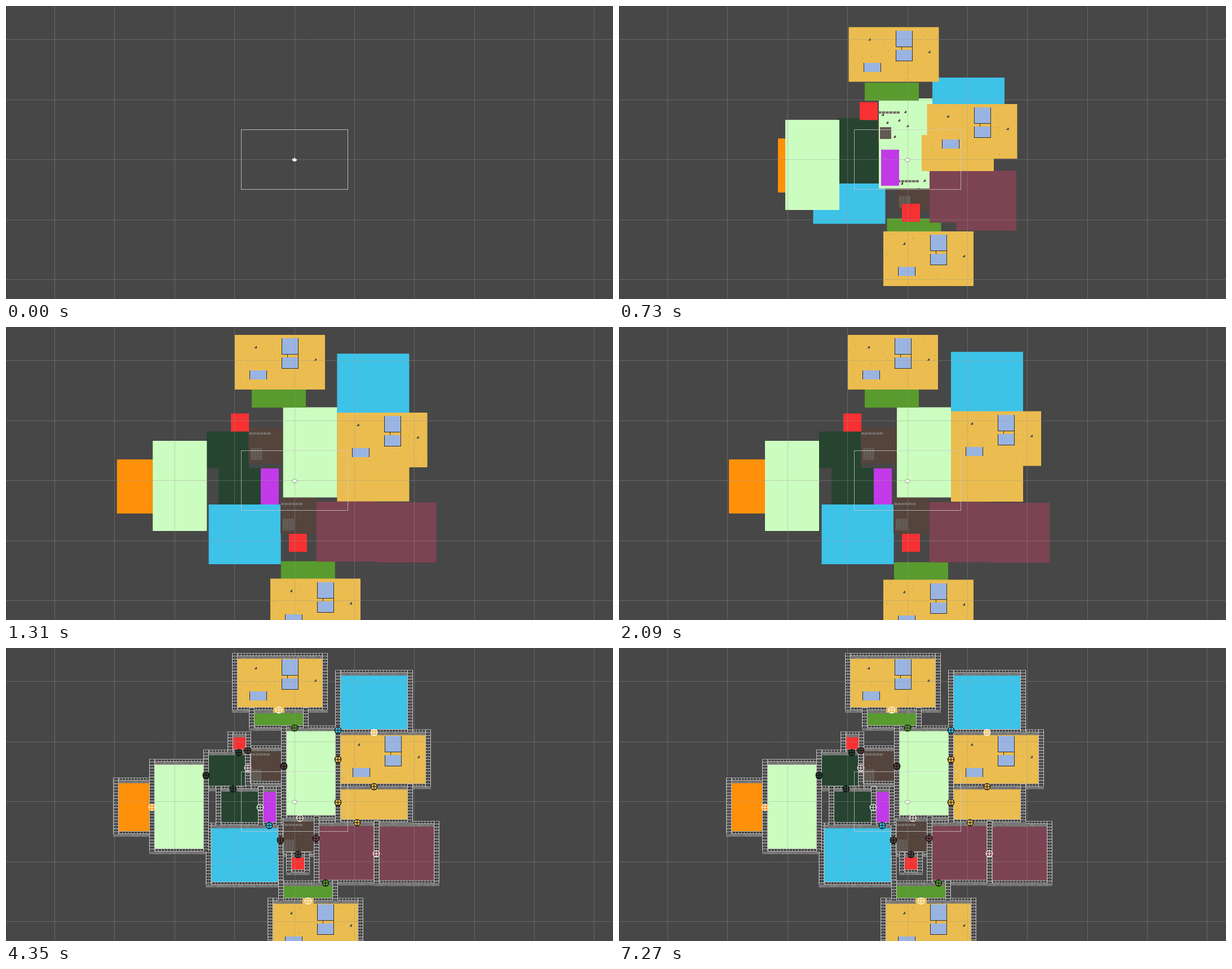
An HTML page with a canvas for the animation above (7400 ms loop, 1077 by 520 pixels).

```html
<!DOCTYPE html>
<html lang="en">
<head>
<meta charset="utf-8">
<title>Dungeon room layout</title>
<style>
  html, body { margin: 0; width: 100%; height: 100%; overflow: hidden; background: #474747; }
  canvas { display: block; width: 1077px; height: 520px; }
</style>
</head>
<body>
<canvas id="stage" width="1077" height="520"></canvas>
<script>
const ctx = document.getElementById('stage').getContext('2d');
const LOOP = 7400, PILE = 480, SPREAD = 660, WALLS = 3650, STEP = 65;

// kind: colour, width, height
const KINDS = {
  hall: ['#ebbc4f', 160, 97], annex: ['#ebbc4f', 128, 64], pool: ['#3dc2e8', 128, 106],
  lawn: ['#ccfdc0', 96, 160], path: ['#599b2f', 96, 32], cell: ['#f73131', 32, 32],
  moss: ['#264430', 75, 65], vault: ['#c23ae8', 32, 64], dock: ['#ff9009', 64, 96],
  wine: ['#7c4452', 106.5, 106.5], store: ['#54443c', 64, 64]
};

// back to front; positions after the first push, mid-way and at rest
const rooms = [
  ['dock', 282, 235, 209, 235, 195, 235],
  ['pool', 344.5, 280.5, 360.5, 315, 359.5, 315],
  ['moss', 387, 199, 365, 185.5, 355, 185.5],
  ['moss', 391, 250, 377, 250, 377, 250],
  ['store', 459, 178, 439, 178, 429, 178],
  ['store', 493, 300, 487, 303, 487, 303],
  ['lawn', 461, 164, 483, 142.5, 493, 142.5],
  ['pool', 556, 127, 577, 69, 589, 44],
  ['path', 475.5, 377, 486.5, 404, 488, 417.5],
  ['wine', 551, 278, 549, 303, 551, 311],
  ['wine', 598.5, 292, 654.5, 306, 657.5, 312],
  ['annex', 537, 229, 577.5, 243, 589, 246],
  ['hall', 546.5, 174, 578, 168.5, 589, 149.5],
  ['lawn', 295, 202, 269.5, 202, 259, 202],
  ['path', 436, 136, 436, 111, 436, 111],
  ['hall', 407.5, 37.5, 406, 14, 406, 14],
  ['hall', 469, 400, 469, 433.5, 469, 448.5],
  ['cell', 502, 351, 502, 367, 502, 367],
  ['cell', 427, 170.5, 407, 153.5, 398, 153.5],
  ['vault', 465, 255, 452, 251, 452, 251]
].map(([kind, ...p], i) => {
  const [color, w, h] = KINDS[kind];
  const pile = [491 + 21 * (i % 4) / 3 - w / 2, 273 + (h < 160 ? (i % 3 - 1) * 10 : 0) - h / 2];
  return { kind, color, w, h, seed: i + 1, keys: [pile, p.slice(0, 2), p.slice(2, 4), p.slice(4)] };
});
const isFront = r => r.kind === 'cell' || r.kind === 'vault';
const backRooms = rooms.filter(r => !isFront(r));
const frontRooms = rooms.filter(isFront);
const stores = rooms.filter(r => r.kind === 'store');

// x, y, floor seen in the opening, opening width
const lightDoors = [
  [484, 110, 'hall', 20], [653, 150, 'hall'], [429, 213, 'store'], [259, 283, 'dock'],
  [451, 283, 'moss'], [521.5, 302, 'store'], [657, 365, 'wine'], [536, 449, 'hall', 20]
];
const darkDoors = [
  [512, 142, 'path'], [589, 146, 'pool'], [589, 198, 'hall'], [653, 246, 'hall'],
  [589, 274, 'annex'], [623, 310, 'annex'], [493, 210, 'store'], [429, 182, 'store'],
  [413, 185.5, 'moss'], [355, 226, 'moss'], [403, 250, 'moss'], [467, 315, 'pool'],
  [487, 341, 'store'], [518, 366.5, 'store'], [550, 338, 'wine'], [567, 417, 'path']
];

const mix = (a, b, k) => a.map((v, i) => v + (b[i] - v) * k);

function random(seed) {
  let s = seed * 7919;
  return () => (s = (s * 16807 + 11) % 2147483647) / 2147483647;
}

function rect(color, x, y, w, h) {
  ctx.fillStyle = color;
  ctx.fillRect(x, y, w, h);
}

function line(color, width, x1, y1, x2, y2, dash = []) {
  ctx.strokeStyle = color;
  ctx.lineWidth = width;
  ctx.setLineDash(dash);
  ctx.beginPath();
  ctx.moveTo(x1, y1);
  ctx.lineTo(x2, y2);
  ctx.stroke();
  ctx.setLineDash([]);
}

function place(keys, t) {
  if (t < SPREAD) return keys[0];
  const s = Math.floor((t - SPREAD) / STEP) * STEP;
  if (s < STEP) return mix(keys[0], keys[1], 0.68);
  if (s < 5 * STEP) {
    const ease = d => 1 - Math.exp(-d / 145);
    return mix(keys[1], keys[2], ease(s - STEP) / ease(4 * STEP));
  }
  return s >= 1425 ? keys[3] : mix(keys[2], keys[3], 1 - Math.exp((5 * STEP - s) / 160));
}

function panel(x, y, w, h) {
  rect('#9ab4e2', x, y, w, h);
  line('#30302c', 1, x - 0.5, y, x - 0.5, y + h);
  line('#30302c', 1, x + w + 0.5, y, x + w + 0.5, y + h);
}

function hallDetails(x, y, seed) {
  const rnd = random(seed);
  for (let i = 0; i < 34; i++) {
    rect(i % 5 ? '#b8934a' : '#6d7d48', x + 4 + rnd() * 152, y + 4 + rnd() * 88, 1, 1);
  }
  const left = Math.round(x), top = Math.round(y);
  panel(left + 84, top + 6, 28, 28);
  panel(left + 84, top + 40, 28, 20);
  panel(left + 27, top + 63, 29, 16);
  line('#30302c', 1, left + 83, top + 34.5, left + 113, top + 34.5);
  line('#30302c', 1, left + 83, top + 59.5, left + 113, top + 59.5);
  line('#30302c', 1, left + 93.5, top + 34, left + 93.5, top + 40);
  line('#30302c', 1, left + 112.5, top + 34, left + 112.5, top + 40);
  for (const [dx, dy] of [[37, 22], [143, 44]]) {
    rect('#4c5661', x + dx - 2, y + dy, 4, 2);
    rect('#39424d', x + dx, y + dy - 2, 2, 3);
  }
}

function storeDetails(x, y) {
  line('#746e69', 4, x + 1, y + 11, x + 39, y + 11, [5.5, 1]);
  rect('#635b55', x + 4, y + 37, 20, 21);
  for (let i = 1; i < 4; i++) {
    line('#564b44', 1, x + 4 + i * 5, y + 38, x + 4 + i * 5, y + 57);
    line('#6b625c', 1, x + 4, y + 37 + i * 5, x + 24, y + 37 + i * 5);
  }
  for (const [dx, dy] of [[9, 15], [38, 25], [53, 35], [17, 29], [30, 54], [49, 10]]) {
    rect('#5f5c58', x + dx - 2, y + dy, 4, 2);
    rect('#45423f', x + dx, y + dy - 2, 2, 4);
  }
}

function drawFloor({ kind, color, w, h, seed, keys }, t) {
  const [x, y] = place(keys, t);
  rect(color, x, y, w, h);
  if (kind === 'hall') hallDetails(x, y, seed);
}

function drawRooms(t) {
  backRooms.forEach(r => drawFloor(r, t));
  stores.forEach(r => storeDetails(...place(r.keys, t)));
  frontRooms.forEach(r => drawFloor(r, t));
}

function stoneFace(x, y, w, seed) {
  const rnd = random(seed);
  rect('#777', x, y, w, 5);
  for (let i = 0; i < w / 3; i++) {
    const shade = i % 13 === 5 ? '#8a5350' : ['#929292', '#606060', '#848484'][i % 3];
    rect(shade, x + rnd() * (w - 3), y + rnd() * 4, 3, 1);
  }
}

function bricksAcross(x, y, w) {
  rect('#b4b4b4', x, y, w, 5);
  line('#1e1e1e', 3, x + 1, y + 2.5, x + w, y + 2.5, [4, 1.32]);
  line('#858585', 1, x + 2, y + 2.5, x + w, y + 2.5, [1.6, 3.72]);
}

function bricksDown(x, y, h) {
  rect('#b4b4b4', x - 5, y, 10, h);
  line('#1e1e1e', 7, x, y + 1, x, y + h, [3.7, 1.62]);
  line('#9a9a9a', 4, x, y + 2.4, x, y + h, [1, 4.32]);
}

function drawWalls() {
  for (const { w, h, seed, keys } of rooms) {
    const [x, y] = keys[3];
    stoneFace(x - 5, y, w + 10, seed);
    bricksAcross(x - 5, y - 5, w + 10);
    bricksAcross(x - 5, y + h - 6, w + 10);
    stoneFace(x - 5, y + h - 1, w + 10, seed + 40);
  }
  for (const { w, h, keys } of rooms) {
    const [x, y] = keys[3];
    bricksDown(x, y - 5, h + 4);
    bricksDown(x + w, y - 5, h + 4);
  }
}

function drawDoors(doors, color) {
  for (const [x, y, kind, gap = 11] of doors) {
    rect(KINDS[kind][0], x - gap / 2, y - 5, gap, 10);
    ctx.strokeStyle = color;
    ctx.lineWidth = 1.2;
    ctx.beginPath();
    ctx.arc(x, y, 5.7, 0, 7);
    ctx.stroke();
    line(color, 1.1, x - 6, y, x + 6, y);
    line(color, 1.1, x, y - 6, x, y + 6);
  }
}

function drawOverlay(t) {
  const grid = 'rgba(150,150,150,.4)';
  line('#3a3a3a', 1, 0.5, 0, 0.5, 520);
  for (let i = 0; i < 10; i++) {
    const x = Math.floor(86.45 + i * 106.39) + 0.5;
    line(grid, 1, x, 0, x, 520);
  }
  for (let i = 0; i < 5; i++) {
    const y = Math.floor(59.9 + i * 106.4) + 0.5;
    line(grid, 1, 0, y, 1077, y);
  }
  ctx.strokeStyle = t < PILE ? '#b8b8b8' : 'rgba(205,205,205,.75)';
  ctx.lineWidth = 1;
  ctx.strokeRect(417.5, 219.5, 189, 106);
  ctx.fillStyle = t < PILE ? '#fff' : '#eef5e8';
  ctx.beginPath();
  ctx.ellipse(512, 273.3, 3.6, 2.5, 0, 0, 7);
  ctx.fill();
  ctx.fillRect(508, 271, 2, 2);
  ctx.fillRect(511, 269.5, 2, 3);
  ctx.fillRect(514, 272, 2, 2);
  if (t >= PILE) {
    ctx.strokeStyle = 'rgba(110,120,105,.6)';
    ctx.beginPath();
    ctx.ellipse(512, 273.3, 4.5, 3.3, 0, 0, 7);
    ctx.stroke();
  }
}

function draw(t) {
  rect('#474747', 0, 0, 1077, 520);
  if (t >= PILE) drawRooms(t);
  if (t >= WALLS) {
    drawWalls();
    drawDoors(darkDoors, '#0c0c0c');
    drawDoors(lightDoors, '#fff');
  }
  drawOverlay(t);
}

const start = performance.now();
function tick() {
  draw((performance.now() - start) % LOOP);
  requestAnimationFrame(tick);
}
tick();
</script>
</body>
</html>
```
